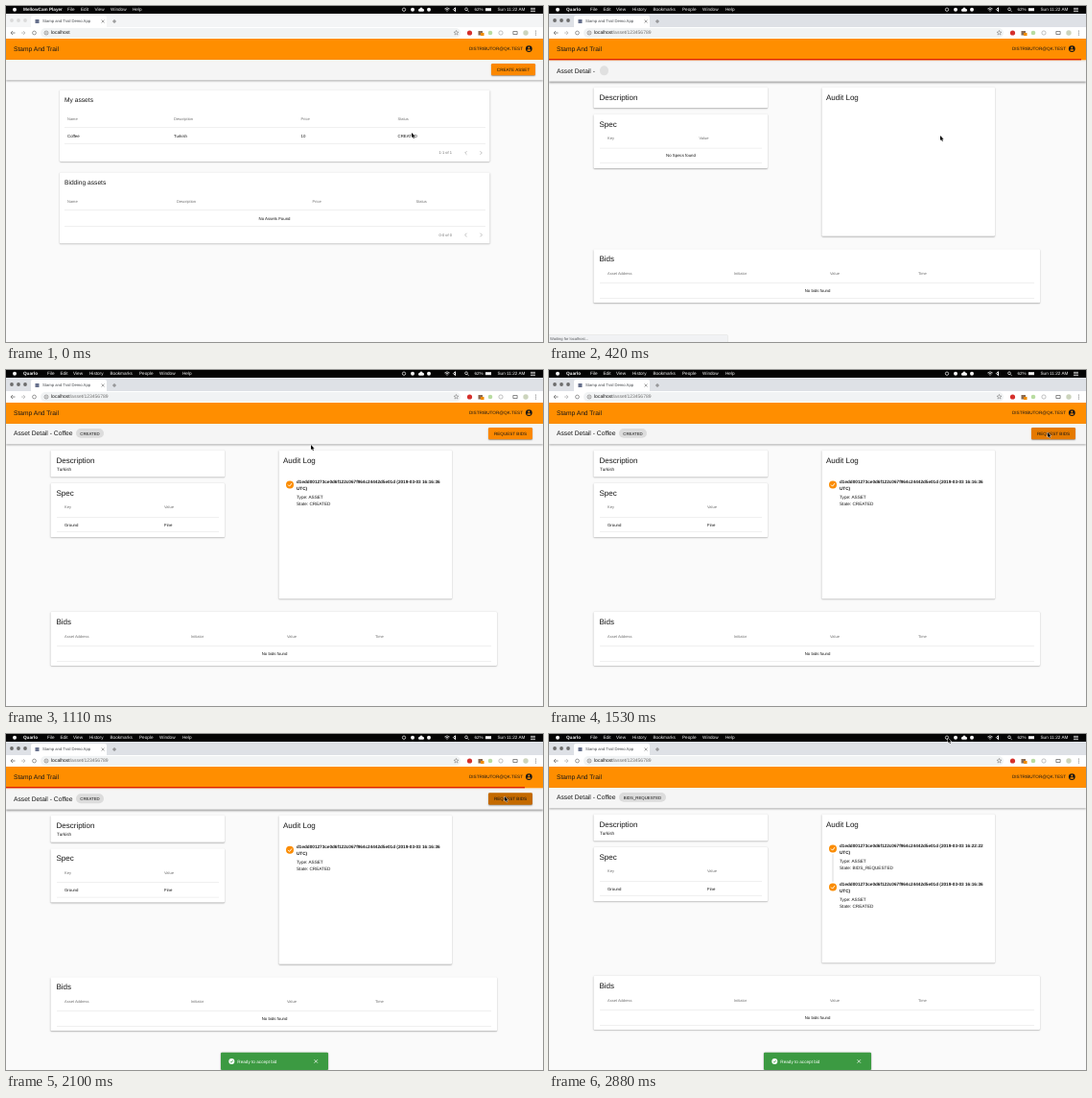
An HTML page with a canvas that plays this animation: 560 by 350 pixels, repeating every 2910 ms.

```html
<!DOCTYPE html>
<html lang="en">
<head>
<meta charset="utf-8">
<title>Stamp and Trail Demo App</title>
<style>
html, body { margin: 0; width: 100%; height: 100%; overflow: hidden; background: #fafafa; }
canvas { display: block; width: 560px; height: 350px; }
</style>
</head>
<body>
<canvas id="stage"></canvas>
<script>
const LOOP = 2910, STEP = 30;
const canvas = document.getElementById('stage');
const ratio = window.devicePixelRatio || 1;
canvas.width = 560 * ratio;
canvas.height = 350 * ratio;
const c = canvas.getContext('2d');
c.scale(ratio, ratio);
c.textRendering = 'geometricPrecision';

const INK = '#161616', DIM = '#707070', PAGE = '#fafafa', CARD = '#ffffff';
const ORANGE = '#ff8e00', BUTTON = '#fb8800', LINE = '#e0e0e0';
const FONT = '"Liberation Sans", Arial, sans-serif';

// Key times in ms
const T = { focus: 60, open: 240, loaded: 480, click: 1590, toast: 1920, done: 2790 };

// Pointer path: time, x, y
const PATH = [
  [0, 423, 132], [150, 423, 132], [420, 408, 135], [510, 400, 132],
  [690, 250, 105], [870, 290, 200], [1110, 318, 78],
  [1410, 520, 65], [2190, 520, 65], [2460, 416, 4], [2910, 416, 4]
];

function text(s, x, y, size = 4.67, color = INK, align = 'left', weight = 400) {
  c.font = `${weight} ${size}px ${FONT}`;
  c.fillStyle = color;
  c.textAlign = align;
  c.fillText(s, x, y + size * 0.35);
}

function rect(x, y, w, h, color) {
  c.fillStyle = color;
  c.fillRect(x, y, w, h);
}

function pill(x, y, w, h, r, color) {
  c.fillStyle = color;
  c.beginPath();
  c.roundRect(x, y, w, h, r);
  c.fill();
}

function dot(x, y, r, color) {
  c.fillStyle = color;
  c.beginPath();
  c.arc(x, y, r, 0, 7);
  c.fill();
}

function ring(x, y, r, color, w = 0.7) {
  c.strokeStyle = color;
  c.lineWidth = w;
  c.beginPath();
  c.arc(x, y, r, 0, 7);
  c.stroke();
}

function stroke(color, w, ...p) {
  c.strokeStyle = color;
  c.lineWidth = w;
  c.beginPath();
  for (let i = 0; i < p.length; i += 2) c.lineTo(p[i], p[i + 1]);
  c.stroke();
}

function shadow(blur, dy, alpha, draw) {
  c.save();
  c.shadowBlur = blur * ratio;
  c.shadowOffsetY = dy * ratio;
  c.shadowColor = `rgba(0,0,0,${alpha})`;
  draw();
  c.restore();
}

function card(x, y, r, b) {
  shadow(1.5, 0.6, 0.36, () => pill(x, y, r - x, b - y, 1, CARD));
}

function rule(x, y, r) {
  rect(x, y, r - x, 0.5, LINE);
}

function labels(names, xs, y, size, color) {
  names.forEach((s, i) => text(s, xs[i], y, size, color));
}

function check(x, y, r, fill, mark) {
  dot(x, y, r, fill);
  stroke(mark, r * 0.24, x - r * 0.5, y, x - r * 0.1, y + r * 0.4, x + r * 0.5, y - r * 0.35);
}

function person(x, y, r, color, back) {
  dot(x, y, r, color);
  dot(x, y - r * 0.32, r * 0.3, back);
  pill(x - r * 0.55, y + r * 0.2, r * 1.1, r * 0.4, r * 0.2, back);
}

function button(label, x, y, color) {
  shadow(1.5, 0.8, 0.4, () => pill(x, y, 46, 12.3, 1.3, color));
  text(label, x + 23, y + 6.2, 4.6, INK, 'center');
}

function menuBar(active) {
  rect(0, 0, 560, 8, '#040404');
  const white = '#f8f8f8';
  dot(9, 3.7, 2, white);
  text(active ? 'Quarlo' : 'MellowCam Player', 18, 3.6, 4.67, white, 'left', 700);
  if (active) {
    labels(['File', 'Edit', 'View', 'History', 'Bookmarks', 'People', 'Window', 'Help'],
      [43, 56.5, 70, 87, 108.5, 139, 160, 184], 3.6, 4.67, white);
  } else {
    labels(['File', 'Edit', 'View', 'Window', 'Help'], [64, 78, 92.5, 109, 132], 3.6, 4.67, white);
  }
  ring(415, 3.7, 1.7, white);
  dot(424, 3.7, 2, white);
  pill(430, 3, 6, 2.7, 1.3, white);
  dot(433, 3, 1.6, white);
  dot(441, 3.7, 2, white);
  for (const r of [1.2, 2.6, 4]) {
    c.strokeStyle = white;
    c.lineWidth = 0.7;
    c.beginPath();
    c.arc(460, 6, r, -2.3, -0.84);
    c.stroke();
  }
  stroke(white, 1, 466.5, 3.7, 468.5, 1.7, 468.5, 5.7, 466.5, 3.7);
  ring(480, 3.3, 1.4, white);
  stroke(white, 0.7, 481, 4.3, 482.5, 5.8);
  text('62%', 488.5, 3.6, 4.5, white);
  rect(500, 2.2, 6, 3, white);
  text('Sun 11:22 AM', 512.5, 3.6, 4.67, white);
  for (let y = 1.9; y < 6.5; y += 1.6) rect(547, y, 5, 0.7, white);
}

function browser(active, detail) {
  rect(0, 8, 560, 14, active ? '#dee1e6' : '#f4f5f6');
  for (const x of [6, 13, 20]) dot(x, 15, 1.9, active ? '#6c6c6c' : '#dadada');
  pill(26, 10, 79, 14, 2, CARD);
  rect(30.5, 14, 4, 4, '#66708c');
  text('Stamp and Trail Demo App', 38, 15.7, 4.2, '#45494d');
  stroke(DIM, 0.6, 99.5, 14.5, 102.5, 17.5);
  stroke(DIM, 0.6, 102.5, 14.5, 99.5, 17.5);
  stroke(DIM, 0.8, 111, 16, 115, 16);
  stroke(DIM, 0.8, 113, 14, 113, 18);

  rect(0, 22, 560, 12, CARD);
  pill(36, 23, 438, 10, 5, '#f1f3f4');
  const fade = '#b8b8b8';
  stroke(DIM, 0.8, 9.5, 28, 5, 28);
  stroke(DIM, 0.8, 7, 26, 5, 28, 7, 30);
  stroke(fade, 0.8, 16, 28, 20, 28);
  stroke(fade, 0.8, 18, 26, 20, 28, 18, 30);
  ring(29.5, 28, 1.9, DIM);
  ring(42, 28, 2, DIM, 0.6);
  rect(41.7, 27, 0.6, 2.2, DIM);
  text('localhost', 47, 27.6, 5, INK);
  if (detail) text('/asset/123456789', 47 + c.measureText('localhost').width, 27.6, 5, DIM);

  c.beginPath();
  for (let i = 0; i < 10; i++) {
    const r = i % 2 ? 1.1 : 2.6, a = i * Math.PI / 5 - Math.PI / 2;
    c.lineTo(469.5 + r * Math.cos(a), 28 + r * Math.sin(a));
  }
  c.closePath();
  c.strokeStyle = DIM;
  c.lineWidth = 0.5;
  c.stroke();
  dot(483.5, 28, 2.6, '#d5302c');
  rect(492.5, 26, 4.5, 4.5, '#8a6a50');
  rect(495, 28, 3.5, 3, '#f08c00');
  dot(505, 28, 2.3, '#b8dca0');
  ring(516, 28, 2.1, '#a8a8a8');
  pill(528.5, 26, 5, 4, 0.7, DIM);
  rect(529.3, 26.8, 3.4, 2.4, CARD);
  dot(542, 28, 2.7, '#ccd4bc');
  for (const y of [26, 28, 30]) dot(552.5, y, 0.6, DIM);
}

function appBar() {
  rect(0, 34, 560, 22, ORANGE);
  text('Stamp And Trail', 8, 44.6, 6.67);
  text('DISTRIBUTOR@QK.TEST', 539, 44.6, 4.67, INK, 'right');
  person(545.3, 44.6, 3.4, INK, ORANGE);
}

function subBar() {
  shadow(2, 1, 0.4, () => rect(0, 56, 560, 21.3, '#f5f5f5'));
}

function pager(label, y) {
  text(label, 465, y, 4, DIM, 'right');
  stroke('#a4a4a4', 0.7, 480.5, y - 1.8, 478.7, y, 480.5, y + 1.8);
  stroke('#a4a4a4', 0.7, 494.5, y - 1.8, 496.3, y, 494.5, y + 1.8);
}

function listPage() {
  subBar();
  button('CREATE ASSET', 506, 60, BUTTON);

  card(56, 87.5, 504.5, 162);
  text('My assets', 61, 98, 6.67);
  const cols = [64, 175, 307.5, 408.5];
  labels(['Name', 'Description', 'Price', 'Status'], cols, 118, 4, DIM);
  rule(61, 126.5, 500);
  labels(['Coffee', 'Turkish', '10', 'CREATED'], cols, 135, 4.33, INK);
  rule(61, 143, 500);
  pager('1-1 of 1', 153);

  card(56, 173.5, 504.5, 247.5);
  text('Bidding assets', 61, 183.5, 6.67);
  labels(['Name', 'Description', 'Price', 'Status'], [64, 178, 319.5, 427.5], 203.5, 4, DIM);
  rule(61, 212.5, 500);
  text('No Assets Found', 280, 221, 4.33, INK, 'center');
  rule(61, 229, 500);
  pager('0-0 of 0', 238.5);
}

function logEntry(y, time, state) {
  check(296, y + 3.5, 4, '#fb8c00', CARD);
  text(`d1edd001273ce0d6f122c067f964c24442d5e01d (2019-03-03 ${time}`, 303, y, 4.67, INK, 'left', 700);
  text('UTC)', 303, y + 7, 4.67, INK, 'left', 700);
  text('Type: ASSET', 303, y + 16, 4.67);
  text('State: ' + state, 303, y + 23, 4.67);
}

function detailPage(t, loaded, busy) {
  const done = t >= T.done;
  c.save();
  if (busy) c.translate(0, 1.33);
  subBar();
  text('Asset Detail - ' + (loaded ? 'Coffee' : ''), 8, 66, 6.72);
  if (loaded) {
    pill(73, 61, done ? 49 : 29, 9.8, 4.9, '#dcdcdc');
    text(done ? 'BIDS_REQUESTED' : 'CREATED', done ? 97.5 : 87.5, 66, 4.33, INK, 'center');
  } else {
    pill(53, 61, 9, 10, 4.5, '#e0e0e0');
  }
  if (loaded && !done) {
    button('REQUEST BIDS', 503, 60,
      t >= T.click && t < 2250 ? '#c46a00' : t >= 1410 && t < 2250 ? '#e57a00' : BUTTON);
  }

  card(46.5, 83.5, 228, loaded ? 111.5 : 105);
  text('Description', 52.5, 93.9, 8);
  if (loaded) text('Turkish', 53, 103, 4.67);

  const y = loaded ? 118 : 111.5;
  card(46.5, y, 228, y + 56.2);
  text('Spec', 52.5, y + 10.3, 8);
  labels(['Key', 'Value'], [61, loaded ? 165 : 156.5], y + 25, 4, DIM);
  rule(53, y + 35, 222);
  if (loaded) labels(['Ground', 'Fine'], [61, 165], y + 43, 4.33, INK);
  else text('No Specs found', 137.5, y + 42.5, 4.33, INK, 'center');
  rule(53, y + 50.5, 222);

  card(284.5, 83.5, 465, 238.5);
  text('Audit Log', 289, 93.9, 8);
  if (done) {
    rect(295.7, 125, 0.6, 29, '#c4c4c4');
    logEntry(116, '16:22:22', 'BIDS_REQUESTED');
    logEntry(156, '16:16:36', 'CREATED');
  } else if (loaded) {
    logEntry(116, '16:16:36', 'CREATED');
  }

  card(46.5, 252, 512, 308);
  text('Bids', 52.5, 262.3, 8);
  labels(['Asset Address', 'Initiator', 'Value', 'Time'], [61, 193, 293, 385], 277.3, 4, DIM);
  rule(53, 287, 506);
  text('No bids found', 280, 295, 4.33, INK, 'center');
  rule(53, 303, 506);
  c.restore();

  if (busy) {
    rect(0, 55, 560, 1.33, ORANGE);
    rect(0, 55, Math.min(555, 541 - (t - 2100) * 0.06), 1.33, '#dd2000');
  }
}

function toast(t) {
  const k = Math.min(1, (t - T.toast) / 120);
  c.save();
  c.translate(0, 19 * (1 - k) ** 2);
  shadow(2, 0.5, 0.4, () => pill(224, 331.8, 112, 18.2, 1.3, '#3c9a42'));
  check(235.3, 341, 3, CARD, '#3c9a42');
  text('Ready to accept bid', 241.3, 341, 4.67, CARD);
  stroke(CARD, 0.7, 321.5, 339.2, 325, 342.7);
  stroke(CARD, 0.7, 325, 339.2, 321.5, 342.7);
  c.restore();
}

function pointer(t) {
  const i = PATH.findIndex(p => p[0] > t);
  const [t0, x0, y0] = PATH[i - 1], [t1, x1, y1] = PATH[i];
  const u = (t - t0) / (t1 - t0), k = u * u * (3 - 2 * u);
  c.save();
  c.translate(x0 + (x1 - x0) * k, y0 + (y1 - y0) * k);
  c.beginPath();
  for (const [x, y] of [[0, 0], [0, 5], [1.1, 4], [2, 6], [2.9, 5.6], [2, 3.7], [3.6, 3.7]]) c.lineTo(x, y);
  c.closePath();
  c.strokeStyle = '#fff';
  c.lineWidth = 0.8;
  c.stroke();
  c.fillStyle = '#000';
  c.fill();
  c.restore();
}

function draw(t) {
  const active = t >= T.focus, detail = t >= T.open, loaded = t >= T.loaded;
  const busy = (detail && !loaded) || (t >= T.click && t < T.done);
  rect(0, 0, 560, 350, PAGE);
  menuBar(active);
  browser(active, detail);
  appBar();
  if (detail) detailPage(t, loaded, busy);
  else listPage();
  if (detail && !loaded) {
    shadow(1, 0, 0.35, () => rect(0, 343, 186, 7, '#f1f2f4'));
    text('Waiting for localhost...', 1, 346.7, 4.1, '#55585c');
  }
  if (t >= T.toast) toast(t);
  pointer(t);
}

const start = performance.now();
function tick() {
  const t = (performance.now() - start) % LOOP;
  draw(Math.floor(t / STEP) * STEP);
  requestAnimationFrame(tick);
}
tick();
</script>
</body>
</html>
```
